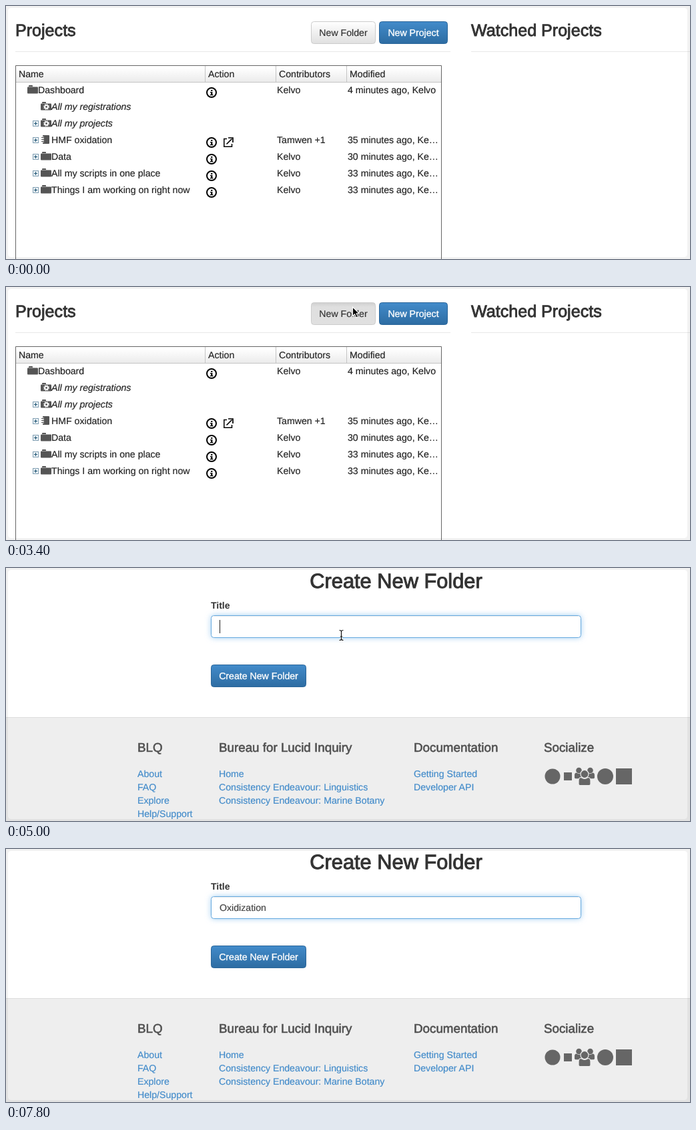
Recreate the animation shown at these times as an HTML page. Size 1025 px wide and 380 px high, loop 8 s.

```html
<!DOCTYPE html>
<html lang="en">
<head>
<meta charset="utf-8">
<title>Create a folder</title>
<style>
  html, body { margin: 0; width: 100%; height: 100%; overflow: hidden; background: #fff; }
  svg { display: block; width: 1025px; height: 380px; }
  text {
    font: 14.15px "Liberation Sans", Arial, sans-serif; white-space: pre; text-rendering: geometricPrecision;
    color: #333; fill: currentColor; stroke: currentColor; stroke-width: .18px;
  }
  .cell { color: #222; }
  .italic { font-style: italic; color: #222; }
  .heading { font-size: 25.1px; stroke-width: .9px; }
  .title { font-size: 30.8px; stroke-width: 1px; text-anchor: middle; }
  .label { font-size: 14px; font-weight: bold; stroke: none; }
  .column { font-size: 18.8px; stroke-width: .6px; color: #505050; }
  .link { color: #428bca; }
  .button { text-anchor: middle; }
  .light { color: #fff; stroke-width: .35px; }
  .typed { color: #444; }
  .focused { stroke: #66a9de; filter: drop-shadow(0 0 4px rgba(102, 175, 233, .6)); }
</style>
</head>
<body>
<svg id="stage" viewBox="0 0 1025 380">
  <defs>
    <linearGradient id="grey" x2="0" y2="1"><stop stop-color="#fff"/><stop offset="1" stop-color="#e0e0e0"/></linearGradient>
    <linearGradient id="blue" x2="0" y2="1"><stop stop-color="#428bca"/><stop offset="1" stop-color="#2d6ca2"/></linearGradient>
    <linearGradient id="head" x2="0" y2="1"><stop offset=".1" stop-color="#fff"/><stop offset="1" stop-color="#ebebeb"/></linearGradient>
    <linearGradient id="pressed" x2="0" y2="1"><stop stop-color="#cfcfcf"/><stop offset=".2" stop-color="#dfdfdf"/><stop offset="1" stop-color="#e0e0e0"/></linearGradient>
    <g id="folder" fill="#555"><path d="M2 2V1q0-1 1-1h4q1 0 1 1v1z"/><rect y="2.5" width="16" height="10" rx="1"/></g>
    <g id="smart">
      <use href="#folder"/>
      <circle cx="8.5" cy="7.5" r="3.6" fill="none" stroke="#fff" stroke-width="1.6" stroke-dasharray="1.5 1.33"/>
      <circle cx="8.5" cy="7.5" r="2.3" fill="none" stroke="#fff" stroke-width="1.8"/>
    </g>
    <g id="notebook">
      <rect x="3" width="10" height="13" rx="1" fill="#555"/>
      <path d="M1 3.5h4M1 6.5h4M1 9.5h4" stroke="#fff" stroke-width="2.4"/>
      <path d="M1 3.5h4M1 6.5h4M1 9.5h4" stroke="#555"/>
    </g>
    <g id="plus" fill="none">
      <rect x=".5" y=".5" width="8" height="8" fill="#f4f9fc" stroke="#7d9cb0"/>
      <path d="M2 4.5h5M4.5 2v5" stroke="#1f5574" stroke-width="1.2"/>
    </g>
    <g id="info">
      <circle r="7" fill="#fff" stroke="#000" stroke-width="2"/>
      <path d="M-1-4h2.4v2H-1zM-2-1h3.4v4h1v1.3h-4.6V3H-1V.3h-1z"/>
    </g>
    <g id="open" fill="none" stroke="#000">
      <path d="M5 2.5H.8v11.7h11.7V10" stroke-width="1.5"/>
      <path d="M4.5 10.5L12.5 2.5M7 1h7v7" stroke-width="1.7"/>
    </g>
  </defs>
  <rect width="1025" height="380" fill="#fff"/>
  <g id="projects"></g>
  <g id="form"></g>
  <path d="M0 0H1025V380H0ZM8 3Q3 3 3 8V372Q3 377 8 377H1016Q1021 377 1021 372V8Q1021 3 1016 3Z" fill="#000" fill-opacity=".05" fill-rule="evenodd"/>
  <path id="arrow" d="M0 0V13.6L3.1 10.8L5.3 16L7.9 14.9L5.7 9.8H9.8Z" fill="#000" stroke="#fff" stroke-width="1.1"/>
  <g id="beam" fill="none">
    <path d="M-3-7.5Q0-7.5 0-5.5Q0-7.5 3-7.5M0-5.5V5.5M-3 7.5Q0 7.5 0 5.5Q0 7.5 3 7.5M-1.8 2H1.8" stroke="#fff" stroke-width="2.6"/>
    <path d="M-3-7.5Q0-7.5 0-5.5Q0-7.5 3-7.5M0-5.5V5.5M-3 7.5Q0 7.5 0 5.5Q0 7.5 3 7.5M-1.8 2H1.8" stroke="#111" stroke-width="1.2"/>
  </g>
</svg>
<script>
const $ = id => document.getElementById(id);

const text = (x, y, str, cls = 'cell') => `<text x="${x}" y="${y}" class="${cls}">${str}</text>`;
const icon = (id, x, y) => `<use href="#${id}" x="${x}" y="${y}"/>`;
const line = (d, color) => `<path d="${d}" fill="none" stroke="${color}"/>`;
const button = (x, y, w, str, blue, id = '') =>
  `<rect id="${id}" x="${x + .5}" y="${y + .5}" width="${w - 1}" height="33" rx="4"
    fill="url(#${blue ? 'blue' : 'grey'})" stroke="${blue ? '#2b669a' : '#ccc'}"/>` +
  text(x + w / 2, y + 22, str, blue ? 'button light' : 'button');

function projectsPage() {
  const person = 'Kelvo';
  const rows = [
    ['Dashboard', 'folder', person, `4 minutes ago, ${person}`],
    ['All my registrations', 'smart'],
    ['All my projects', 'smart'],
    ['HMF oxidation', 'notebook', 'Tamwen +1', '35 minutes ago, Ke…'],
    ['Data', 'folder', person, '30 minutes ago, Ke…'],
    ['All my scripts in one place', 'folder', person, '33 minutes ago, Ke…'],
    ['Things I am working on right now', 'folder', person, '33 minutes ago, Ke…'],
  ];
  const header = [[19, 'Name'], [303, 'Action'], [409, 'Contributors'], [515, 'Modified']];
  return text(14, 45, 'Projects', 'heading') + text(697, 45, 'Watched Projects', 'heading') +
    line('M14 68.5H666M697 68.5H1025', '#e8e8e8') +
    button(457, 23, 97, 'New Folder', false, 'newFolder') +
    button(559, 23, 103, 'New Project', true) +
    '<rect x="15" y="90" width="637" height="24" fill="url(#head)"/>' +
    line('M15 114.5H652M298.5 90V114M404.5 90V114M510.5 90V114', '#c4c4c4') +
    line('M14.5 380V89.5H652.5V380', '#666') +
    header.map(([x, str]) => text(x, 107, str)).join('') +
    rows.map(([name, kind, who, when], i) => {
      const y = 131 + 25 * i, x = i ? 52 : 32;
      return icon(kind, x, y - 12) + (i > 1 ? icon('plus', 40, y - 9) : '') +
        text(x + 16, y, name, kind === 'smart' ? 'italic' : 'cell') +
        (who ? icon('info', 308, y - 1) + text(406, y, who) + text(512, y, when) : '') +
        (kind === 'notebook' ? icon('open', 326, y - 9) : '');
    }).join('');
}

function formPage() {
  const columns = [
    [197, 'BLQ', 'About', 'FAQ', 'Explore', 'Help/Support'],
    [319, 'Bureau for Lucid Inquiry', 'Home', 'Consistency Endeavour: Linguistics', 'Consistency Endeavour: Marine Botany'],
    [611, 'Documentation', 'Getting Started', 'Developer API'],
    [806, 'Socialize'],
  ];
  const member = (x, y, s) => `<g transform="translate(${x} ${y}) scale(${s})">
    <circle r="6"/><path d="M-9 15V10Q-9 5-5 5Q0 9 5 5Q9 5 9 10V15Q9 17 7 17H-7Q-9 17-9 15Z"/></g>`;
  const social = '<g fill="#666"><circle cx="819" cy="313" r="11.5"/><rect x="836" y="307" width="12" height="12"/>' +
    member(858.5, 304, .72) + member(875.5, 304, .72) +
    `<g stroke="#eee" stroke-width="1.2">${member(867, 309.5, 1)}</g>` +
    '<circle cx="898" cy="313" r="12"/><rect x="914" y="301" width="24" height="24"/></g>';
  return text(584.5, 30, 'Create New Folder', 'title') + text(307, 61, 'Title', 'label') +
    '<rect id="field" x="307.5" y="71.5" width="554" height="33" rx="4" fill="#fff" stroke="#ccc"/>' +
    line('M310 72.5H859', '#f0f0f0') +
    '<text id="typed" x="320" y="93" class="typed"></text><path id="caret" d="M0 78V98" stroke="#222"/>' +
    button(307, 145, 143, 'Create New Folder', true) +
    '<rect y="224" width="1025" height="156" fill="#eee"/>' + line('M0 224.5H1025', '#ddd') +
    columns.map(([x, head, ...links]) => text(x, 276, head, 'column') +
      links.map((str, i) => text(x, 314 + 20 * i, str, 'link')).join('')).join('') + social;
}

$('projects').innerHTML = projectsPage();
$('form').innerHTML = formPage();

const LOOP = 8000, STEP = 200;
const SHOW_CURSOR = 1400, PRESS = 3200, OPEN_FORM = 3600, BEAM = 3800, FOCUS = 4800, TYPE = 5600;
const WORD = 'Oxidization';
const path = [
  [1400, 767, 358], [1600, 757, 341], [2000, 682, 205], [2400, 588, 82], [2800, 519.5, 30],
  [4200, 519.5, 30], [4600, 504.5, 93], [4800, 502.5, 101],
];

function cursorAt(t) {
  const next = path.findIndex(p => p[0] > t);
  if (next < 1) return (next ? path[path.length - 1] : path[0]).slice(1);
  const [a, b] = [path[next - 1], path[next]];
  const k = (t - a[0]) / (b[0] - a[0]);
  return [a[1] + (b[1] - a[1]) * k, a[2] + (b[2] - a[2]) * k];
}

// Five quick letters, then a steadier pace.
const lettersAt = t => t < TYPE ? 0 :
  Math.min(WORD.length, t < 6200 ? 1 + Math.floor((t - TYPE) / 150) : 5 + Math.floor((t - 6200) / STEP));

const show = (id, on) => $(id).setAttribute('visibility', on ? 'visible' : 'hidden');
const display = (id, on) => $(id).style.display = on ? '' : 'none';

function render(t) {
  const [x, y] = cursorAt(t);
  const onForm = t >= OPEN_FORM;
  display('projects', !onForm);
  display('form', onForm);

  const hover = t >= SHOW_CURSOR && x > 457 && x < 554 && y > 23 && y < 57;
  $('newFolder').setAttribute('fill', t >= PRESS ? 'url(#pressed)' : hover ? '#e0e0e0' : 'url(#grey)');

  display('arrow', t >= SHOW_CURSOR && t < BEAM);
  display('beam', t >= BEAM && t < TYPE);
  for (const id of ['arrow', 'beam']) $(id).setAttribute('transform', `translate(${x} ${y})`);

  const count = lettersAt(t);
  const typed = $('typed');
  typed.textContent = WORD.slice(0, count);
  $('field').setAttribute('class', t >= FOCUS ? 'focused' : '');
  const width = onForm && count ? typed.getComputedTextLength() : 0;
  $('caret').setAttribute('transform', `translate(${Math.round(320 + width) + .5} 0)`);
  const blinkOn = t < TYPE ? t < FOCUS + 500 : t < 7800;
  show('caret', t >= FOCUS && blinkOn);
}

const start = performance.now();
function frame() {
  const t = (performance.now() - start) % LOOP;
  render(Math.floor(t / STEP) * STEP);
  requestAnimationFrame(frame);
}
frame();
</script>
</body>
</html>
```
